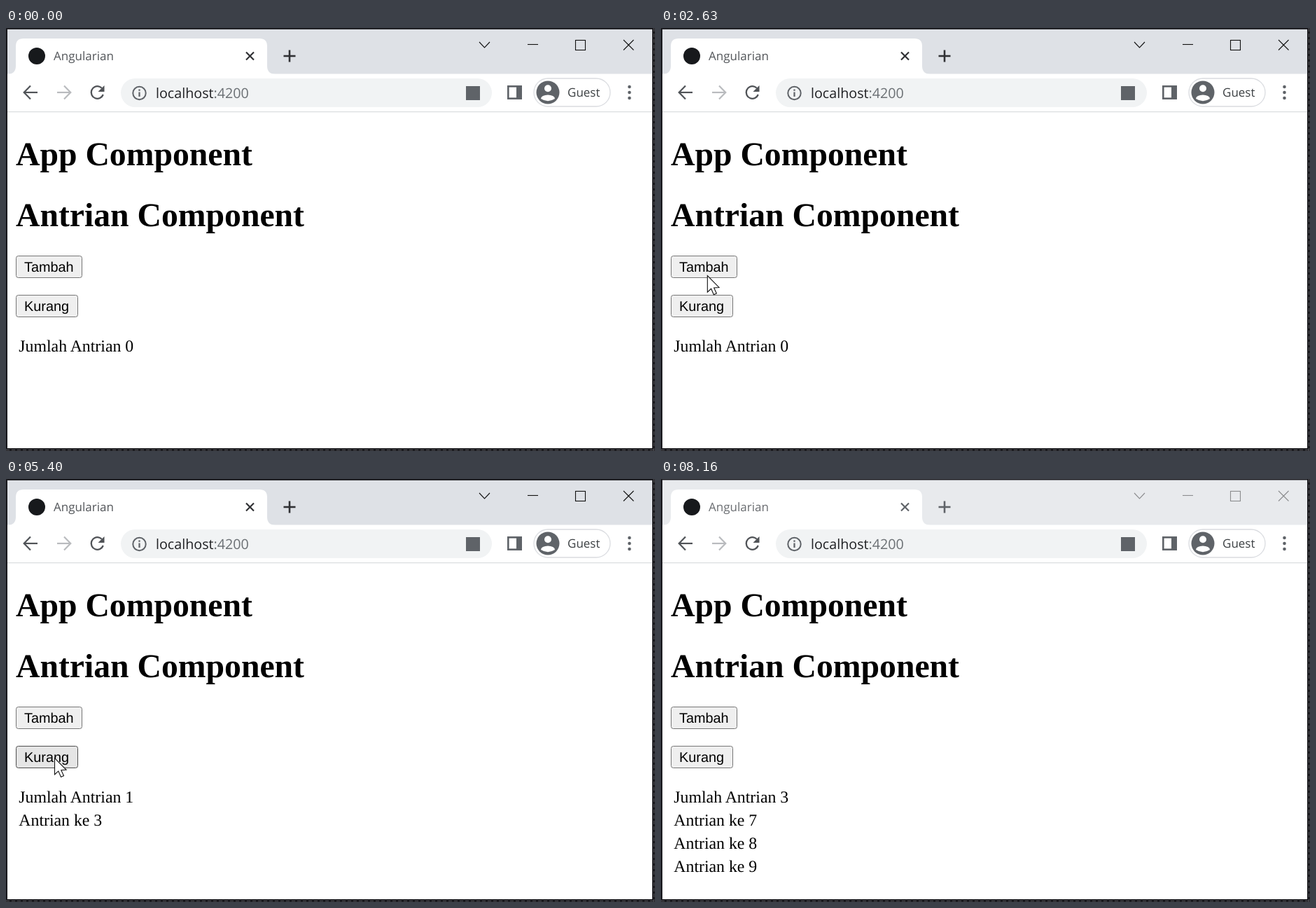
Animation of 927 by 604 pixels, one loop 8.38 s. Source, as an HTML page with a canvas:

```html
<!DOCTYPE html>
<html lang="id">
<head>
<meta charset="utf-8">
<title>Angularian</title>
<style>
  html, body { margin: 0; width: 100%; height: 100%; overflow: hidden; background: #fff; }
  canvas { display: block; }
</style>
</head>
<body>
<canvas id="stage" width="927" height="604"></canvas>
<script>
const ctx = document.getElementById('stage').getContext('2d');
const LOOP = 8380, STEP = 50;
const UI = '"Open Sans", "Noto Sans", sans-serif';
const SANS = '"Liberation Sans", Arial, sans-serif';
const SERIF = '"Liberation Serif", "Times New Roman", serif';
const GREY = '#5f6368';

// Fractional glyph advances, so that text widths follow the font size
ctx.textRendering = 'geometricPrecision';

const BUTTONS = [
  { label: 'Tambah', x: 14, y: 325, w: 95, h: 32, add: true },
  { label: 'Kurang', x: 14, y: 381, w: 89, h: 32, add: false }
];

// Mouse press and release times, with the index of the button
const CLICKS = [
  [660, 810, 0], [1070, 1240, 0], [1840, 1980, 1], [2190, 2360, 1],
  [2880, 3000, 0], [3220, 3410, 0], [3590, 3710, 0], [3970, 4070, 0],
  [4710, 4810, 1], [4980, 5130, 1], [5250, 5400, 1], [5570, 5670, 1],
  [6570, 6620, 0], [6830, 6950, 0], [7100, 7220, 0]
];

// Pointer moves: start time, number of steps, target
const ENTRY = { x: 760, y: 605 };
const MOVES = [
  [50, 9, 45, 339], [1390, 9, 63, 390], [2510, 7, 67, 338],
  [4240, 9, 69, 398], [6150, 8, 69, 344], [6620, 1, 68, 341],
  [7480, 8, 678, 645]
];
const LEAVE = 7480;

const easeOut = p => 1 - Math.pow(1 - p, 2.2);
const easeIn = p => Math.pow(p, 1.5);

function pointer(t) {
  let { x, y } = ENTRY;
  for (const [start, steps, tx, ty] of MOVES) {
    if (t < start) break;
    const p = Math.min(1, (Math.floor((t - start) / STEP) + 1) / steps);
    const k = start === LEAVE ? easeIn(p) : easeOut(p);
    x += (tx - x) * k;
    y += (ty - y) * k;
  }
  return { x, y };
}

function queueAt(t) {
  const queue = [];
  let next = 1;
  for (const [, up, i] of CLICKS) {
    if (t < up) break;
    if (BUTTONS[i].add) queue.push(next++);
    else queue.pop();
  }
  return queue;
}

function rect(x, y, w, h, color) {
  ctx.fillStyle = color;
  ctx.fillRect(x, y, w, h);
}

function round(x, y, w, h, r, fill, stroke, width = 1) {
  ctx.beginPath();
  ctx.roundRect(x, y, w, h, r);
  if (fill) { ctx.fillStyle = fill; ctx.fill(); }
  if (stroke) { ctx.strokeStyle = stroke; ctx.lineWidth = width; ctx.stroke(); }
}

function disc(x, y, r, color) {
  ctx.beginPath();
  ctx.arc(x, y, r, 0, Math.PI * 2);
  ctx.fillStyle = color;
  ctx.fill();
}

function line(color, width, ...pts) {
  ctx.beginPath();
  for (let i = 0; i < pts.length; i += 2) ctx.lineTo(pts[i], pts[i + 1]);
  ctx.strokeStyle = color;
  ctx.lineWidth = width;
  ctx.stroke();
}

function poly(color, ...pts) {
  ctx.beginPath();
  for (let i = 0; i < pts.length; i += 2) ctx.lineTo(pts[i], pts[i + 1]);
  ctx.closePath();
  ctx.fillStyle = color;
  ctx.fill();
}

function text(str, x, y, font, color) {
  ctx.font = font;
  ctx.fillStyle = color;
  ctx.fillText(str, x, y);
}

function drawFrame() {
  rect(0, 0, 927, 604, '#1b1b1f');
  ctx.setLineDash([5, 3]);
  line('#55555a', 1, 925.5, 0, 925.5, 604);
  line('#55555a', 1, 0, 602.5, 927, 602.5);
  ctx.setLineDash([]);
  rect(2, 2, 921, 598, '#fff');
}

function drawTabs(focused) {
  rect(2, 1, 921, 1, focused ? '#2c2c30' : '#828388');
  rect(2, 2, 921, 63.5, focused ? '#dee1e6' : '#e8eaed');

  ctx.beginPath();
  ctx.moveTo(2, 66);
  ctx.quadraticCurveTo(14, 66, 14, 54);
  ctx.lineTo(14, 26);
  ctx.quadraticCurveTo(14, 15, 25, 15);
  ctx.lineTo(362, 15);
  ctx.quadraticCurveTo(373, 15, 373, 26);
  ctx.lineTo(373, 54);
  ctx.quadraticCurveTo(373, 66, 385, 66);
  ctx.fillStyle = '#fff';
  ctx.fill();

  disc(44, 40, 12, '#17191c');
  text('Angularian', 68, 45.5, '17px ' + UI, focused ? '#53565a' : '#6a6d71');
  const mark = focused ? '#303134' : GREY;
  line(mark, 2.2, 343, 34.5, 354, 45.5);
  line(mark, 2.2, 354, 34.5, 343, 45.5);
  line(mark, 2.6, 396.5, 40, 413.5, 40);
  line(mark, 2.6, 405, 31.5, 405, 48.5);

  const cap = focused ? '#111' : '#8b8c8e';
  line(cap, 1.1, 676, 20, 683.5, 28, 691, 20);
  line(cap, 1.1, 745, 23.5, 760, 23.5);
  ctx.strokeRect(813.5, 17.5, 14, 14);
  line(cap, 1.1, 882, 17, 896.5, 31.5);
  line(cap, 1.1, 896.5, 17, 882, 31.5);
}

function drawToolbar() {
  const dark = '#505357', pale = '#b9bbbe';
  line(dark, 2.2, 45, 92, 26, 92);
  line(dark, 2.2, 35, 82.5, 25.7, 92, 35, 101.5);
  line(pale, 2.2, 73, 92, 92, 92);
  line(pale, 2.2, 83, 82.5, 92.3, 92, 83, 101.5);

  ctx.beginPath();
  ctx.arc(130.5, 92, 8.8, 0.35, Math.PI * 1.75);
  ctx.strokeStyle = dark;
  ctx.lineWidth = 2.3;
  ctx.stroke();
  poly(dark, 140.5, 82, 140.5, 91, 131.5, 91);

  round(164, 72, 530, 41, 20.5, '#f1f3f4');
  ctx.beginPath();
  ctx.arc(190.5, 93, 9.2, 0, Math.PI * 2);
  ctx.strokeStyle = GREY;
  ctx.lineWidth = 2;
  ctx.stroke();
  rect(189.4, 91.5, 2.2, 6.5, GREY);
  rect(189.4, 87.5, 2.2, 2.3, GREY);

  const font = '19.7px ' + UI;
  text('localhost', 214, 100, font, '#202124');
  text(':4200', 214 + ctx.measureText('localhost').width, 100, font, '#6b7074');

  rect(657, 83, 20, 20, GREY);

  ctx.strokeStyle = GREY;
  ctx.lineWidth = 2.6;
  ctx.strokeRect(717.3, 83.3, 18.4, 17.4);
  rect(729, 82, 8, 20, GREY);

  round(754, 72, 109, 40, 20, '#fff', '#dadce0', 1.3);
  disc(774, 92, 16.5, GREY);
  disc(774, 86.2, 5, '#fff');
  ctx.beginPath();
  ctx.ellipse(774, 101, 10, 5.6, 0, Math.PI, 0);
  ctx.quadraticCurveTo(774, 107.5, 764, 101);
  ctx.fill();
  text('Guest', 802, 97.5, '17px ' + UI, '#3c4043');

  for (const y of [84, 92, 100]) disc(890.5, y, 2.3, GREY);
  rect(2, 119, 921, 1.3, '#dcdee0');
}

function drawButton(b, state) {
  const [fill, edge] = {
    normal: ['#efefef', '#767676'],
    hover: ['#e5e5e5', '#4f4f4f'],
    active: ['#f5f5f5', '#8d8d8d']
  }[state];
  round(b.x + .5, b.y + .5, b.w - 1, b.h - 1, 3, fill, edge);
  text(b.label, b.x + 12, b.y + 22.5, '19.85px ' + SANS, '#000');
}

function drawScrollbar() {
  rect(898, 121, 25, 479, '#f1f1f1');
  rect(901, 146, 20, 415, '#c1c1c1');
  poly('#a3a3a3', 905, 137, 910.5, 130.5, 916, 137);
  poly('#505050', 905, 584, 910.5, 590.5, 916, 584);
}

function drawPage(t, click, focused) {
  const h1 = 'bold 47.7px ' + SERIF, body = '23.8px ' + SERIF;
  text('App Component', 14, 196, h1, '#000');
  text('Antrian Component', 14, 282.7, h1, '#000');

  const p = pointer(t - 60);
  BUTTONS.forEach((b, i) => {
    const over = p.x >= b.x && p.x < b.x + b.w && p.y >= b.y && p.y < b.y + b.h;
    const active = focused && click && click[2] === i;
    drawButton(b, active ? 'active' : over ? 'hover' : 'normal');
  });

  const queue = queueAt(t);
  const rows = ['Jumlah Antrian ' + queue.length, ...queue.map(n => 'Antrian ke ' + n)];
  rows.forEach((row, i) => text(row, 18.3, 462.4 + 32.8 * i, body, '#000'));
  if (queue.length > 3) drawScrollbar();
}

function drawPointer(t, click) {
  if (t < MOVES[0][0]) return;
  const { x, y } = pointer(t);
  if (click) disc(x, y, 18.5, 'rgba(252,244,10,.55)');
  ctx.save();
  ctx.translate(x + .5, y + .5);
  poly('#fff', 0, 0, 0, 23.5, 5.3, 18.6, 9, 27, 13, 25.3, 9.3, 17.2, 16.6, 16.8);
  ctx.strokeStyle = '#111';
  ctx.lineWidth = 1.1;
  ctx.stroke();
  ctx.restore();
}

function render(t) {
  const focused = t < 50 || (t >= 720 && t < 8160);
  const click = CLICKS.find(([down, up]) => t >= down && t < up);
  drawFrame();
  drawTabs(focused);
  drawToolbar();
  drawPage(t, click, focused);
  drawPointer(t, click);
}

const began = performance.now();
function tick() {
  render((performance.now() - began) % LOOP);
  requestAnimationFrame(tick);
}
tick();
</script>
</body>
</html>
```
